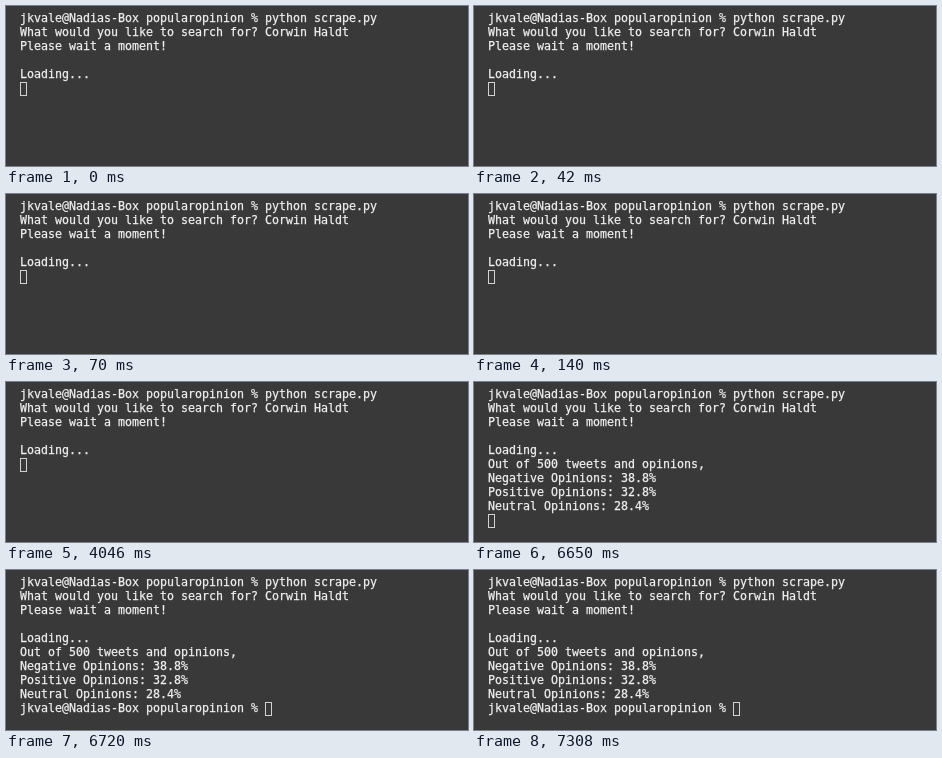
An HTML page that plays this animation: 462 px wide and 160 px high, repeating every 7.7 s.

```html
<!DOCTYPE html>
<html lang="en">
<head>
<meta charset="utf-8">
<title>Terminal</title>
<style>
  html, body { margin: 0; width: 100%; height: 100%; overflow: hidden; background: #393939; }
  #screen {
    position: absolute; left: 14px; top: 5px; margin: 0;
    font: 11.63px/14px "DejaVu Sans Mono", Menlo, monospace;
    color: #f0f0f0; white-space: pre;
    -webkit-text-stroke: 0.25px #f0f0f0;
  }
  .cursor {
    display: inline-block; box-sizing: border-box;
    position: relative; top: 1px;
    width: 7px; height: 14px; vertical-align: top;
    border: 1px solid #d2d2d2;
  }
</style>
</head>
<body>
<pre id="screen"></pre>
<script>
  const LOOP = 7700;
  const prompt = "jkvale@Nadias-Box popularopinion % ";
  const waiting = [
    prompt + "python scrape.py",
    "What would you like to search for? Corwin Haldt",
    "Please wait a moment!",
    "",
    "Loading...",
    ""
  ].join("\n");
  const results = waiting + [
    "Out of 500 tweets and opinions,",
    "Negative Opinions: 38.8%",
    "Positive Opinions: 32.8%",
    "Neutral Opinions: 28.4%",
    ""
  ].join("\n");

  const steps = [
    { at: 0, text: waiting },
    { at: 6650, text: results },
    { at: 6720, text: results + prompt }
  ];

  const screen = document.getElementById("screen");
  const output = document.createTextNode("");
  const cursor = document.createElement("span");
  cursor.className = "cursor";
  screen.append(output, cursor);

  let shown;
  const start = performance.now();

  function draw(now) {
    const t = Math.max(0, now - start) % LOOP;
    const step = steps.findLast(s => t >= s.at);
    if (step !== shown) {
      output.data = step.text;
      shown = step;
    }
    requestAnimationFrame(draw);
  }
  draw(start);
</script>
</body>
</html>
```
